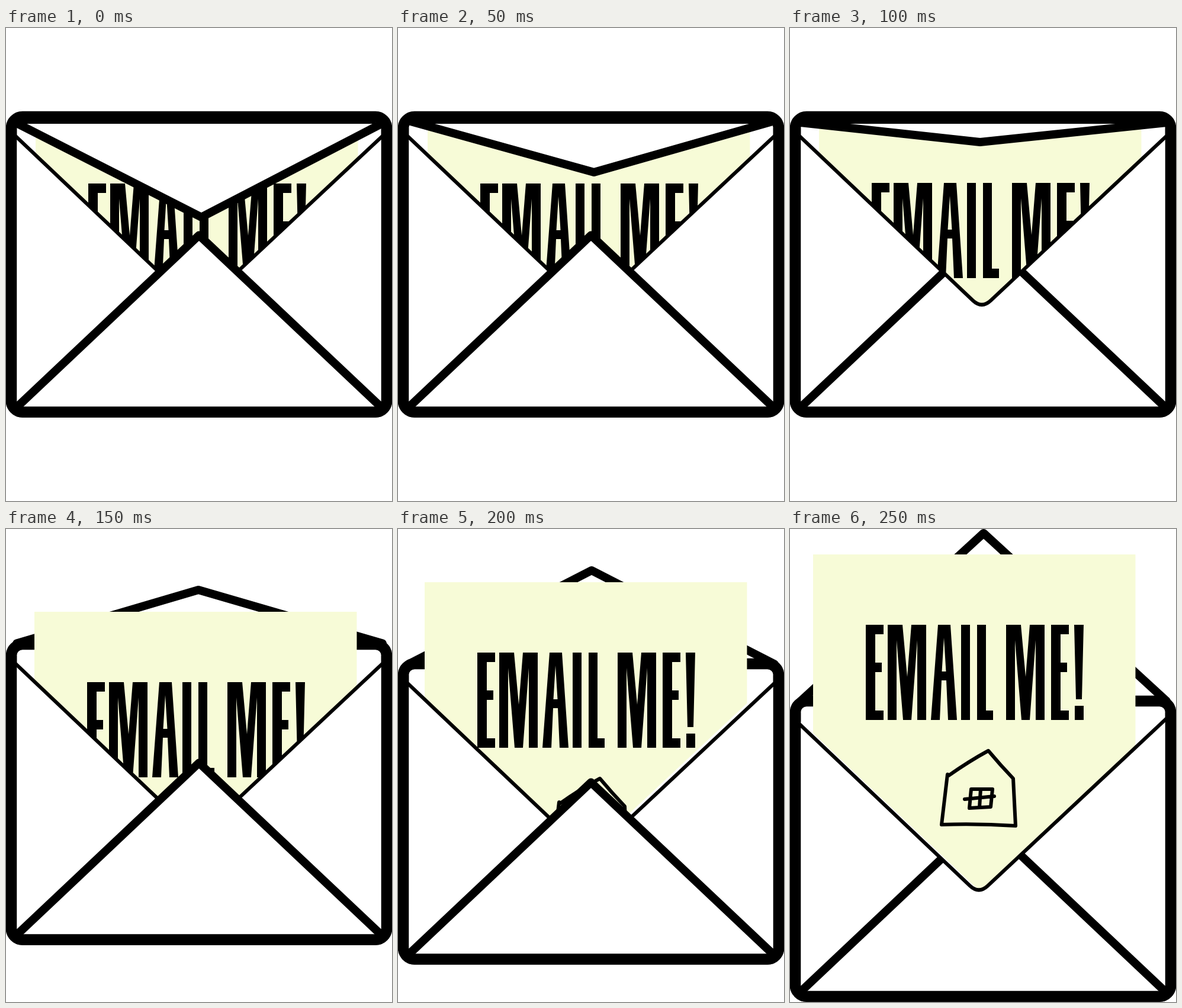
An HTML page with a canvas that plays this animation: 652x800 px, repeating every 0.3 s.

```html
<!DOCTYPE html>
<html lang="en">
<head>
<meta charset="utf-8">
<title>Email me</title>
<style>
  html, body { margin: 0; width: 100%; height: 100%; overflow: hidden; background: #fff; }
  canvas { display: block; }
</style>
</head>
<body>
<canvas id="stage" width="652" height="800" role="img" aria-label="EMAIL ME!"></canvas>
<script>
const ctx = document.getElementById('stage').getContext('2d');
const PAPER = '#f7fbd7';
const STEP = 50;

// flap: [tip x, tip y, hinge y]; body: envelope drop; letter: offset of the sheet;
// deep: pocket without the raised bottom fold; shift: pocket edge offset; gap: sliver beside the sheet
const poses = [
  { flap: [330, 320, 161],   body: 0,   letter: [11, 101] },
  { flap: [331, 244, 157],   body: 0,   letter: [11, 101] },
  { flap: [321, 193, 160],   body: 0,   letter: [10, 100], deep: true },
  { flap: [325, 103, 193.5], body: 45,  letter: [9, 97] },
  { flap: [327, 70, 228.5],  body: 78,  letter: [6, 47], gap: 10 },
  { flap: [327, 7, 291],     body: 141, letter: [0, 0], deep: true, shift: [-5, 1.5] }
];

// Condensed lettering, cap height 161
const letterE = x => `M${x} 162h30v16h-14v48h11v16h-11v65h14v16h-30z`;
const letterM = x => `M${x} 162h25l8 88l7-88h25v161h-15v-135l-10 135h-14l-11-135v135h-15z`;
const words = new Path2D([
  letterE(128), letterM(165),
  'M250 162h21l11 161h-15l-3-67h-8l-3 67h-15zM260 184l-3.5 57h7z',
  'M289 162h15v161h-15z',
  'M316 162h15v145h12v16h-27z',
  letterM(365), letterE(441),
  'M480 162h16l-3 126h-10zM481 299h15v24h-15z'
].join(''));

const house = new Path2D('M266 415L256 500Q318 498 381 502L377 422Q355 399 335 375Q302 393 268 417');
const pane = new Path2D('M306 440L342 440L339 470L303 472ZM295 457L345 452M322 440L320 471');

const edge = 'M10 177L309 461Q324 475 339 461L642 177';
const pocketEdge = new Path2D(edge);
const pocket = new Path2D(edge + 'V648H10Z');
const fold = new Path2D('M14 645.4L326 350.5L638 645.4');
const rim = new Path2D('M9 169V630A19 19 0 0 0 28 649.5H624A19 19 0 0 0 643 630V169');
const shell = new Path2D();
shell.roundRect(9, 150, 634, 499.5, 19);

function stroke(path, width) {
  ctx.lineWidth = width;
  ctx.stroke(path);
}

function fill(path, color) {
  ctx.fillStyle = color;
  ctx.fill(path, 'evenodd');
}

function moved([x, y], paint) {
  ctx.save();
  ctx.translate(x, y);
  paint();
  ctx.restore();
}

function drawFlap([x, y, hinge]) {
  const path = new Path2D(`M18 ${hinge}L${x} ${y}L636 ${hinge}`);
  fill(path, '#fff');
  stroke(path, 14);
}

function drawLetter([x, y], bottom) {
  ctx.fillStyle = PAPER;
  ctx.fillRect(39 + x, 43 + y, 544.5, bottom - 43 - y);
  moved([x, y], () => {
    fill(words, '#000');
    stroke(house, 6);
    stroke(pane, 6);
  });
}

function drawFront({ deep, shift = [0, 0], gap = 0 }) {
  moved([-gap, 0], () => fill(pocket, '#fff'));
  moved(shift, () => {
    fill(pocket, '#fff');
    if (deep) {
      ctx.save();
      ctx.clip(pocket);
      ctx.translate(-shift[0], -shift[1]);
      stroke(fold, 14);
      ctx.restore();
    }
    stroke(pocketEdge, 6);
  });
  if (!deep) {
    fill(fold, '#fff');
    stroke(fold, 14);
  }
  ctx.lineCap = 'butt';
  stroke(rim, 18.5);
}

function draw(pose) {
  const { flap, body, letter } = pose;
  const open = flap[1] < flap[2];
  ctx.fillStyle = '#fff';
  ctx.fillRect(0, 0, 652, 800);
  ctx.strokeStyle = '#000';
  ctx.lineCap = ctx.lineJoin = 'round';

  if (open) drawFlap(flap);
  moved([0, body], () => {
    fill(shell, '#fff');
    stroke(shell, 18.5);
  });
  drawLetter(letter, 620 + body);
  moved([0, body], () => drawFront(pose));
  if (!open) {
    drawFlap(flap);
    ctx.fillStyle = '#000';
    ctx.fillRect(28, 141, 596, 21);
  }
}

function tick(now) {
  draw(poses[Math.floor(Math.max(now, 0) / STEP) % poses.length]);
  requestAnimationFrame(tick);
}
draw(poses[0]);
requestAnimationFrame(tick);
</script>
</body>
</html>
```
